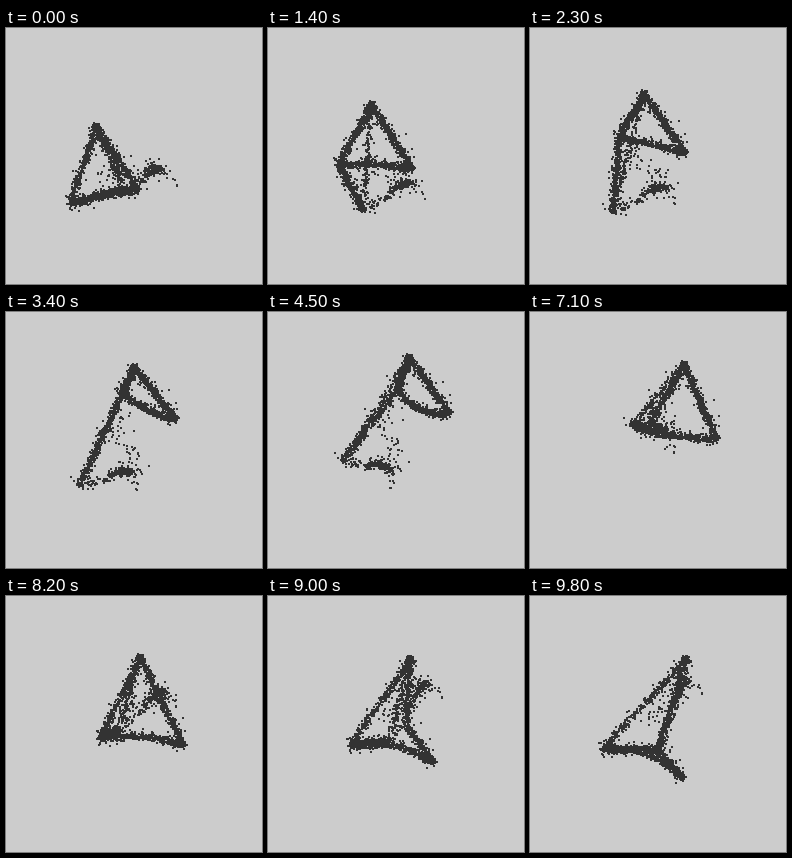
Write an HTML page with a canvas that moves like this. It is 256x256 px and loops after 10000 ms.

```html
<!DOCTYPE html>
<html lang="en">
<head>
<meta charset="utf-8">
<title>Point cloud tour</title>
<style>
html, body { margin: 0; width: 100%; height: 100%; overflow: hidden; background: #ccc; }
canvas { display: block; width: 256px; height: 256px; }
</style>
</head>
<body>
<canvas id="stage" width="256" height="256"></canvas>
<script>
const ctx = document.getElementById('stage').getContext('2d');
const LOOP = 10000, STEP = 100;
const SPAN = 15; // steps between two key points of a path

const clamp = (v, lo, hi) => Math.min(hi, Math.max(lo, v));
const mix = (a, b, u) => a.map((v, i) => v + (b[i] - v) * u);

// Catmull-Rom curve through evenly timed points
function path(...pts) {
  const at = i => pts[clamp(i, 0, pts.length - 1)];
  return s => {
    const i = Math.min(Math.floor(s / SPAN), pts.length - 2), u = s / SPAN - i;
    const [a, b, c, d] = [-1, 0, 1, 2].map(k => at(i + k));
    return b.map((v, k) => v + 0.5 * u * (c[k] - a[k]
      + u * (2 * a[k] - 5 * v + 4 * c[k] - d[k]
      + u * (3 * (v - c[k]) + d[k] - a[k]))));
  };
}

// Corners of the cloud and the end of its loose arm
const corners = {
  top: path([90, 99], [106, 74], [127, 57], [146, 44], [162, 49], [134, 62], [156, 63]),
  left: path([65, 175], [74, 130], [115, 82], [132, 79], [125, 106], [95, 142], [73, 153]),
  right: path([132, 161], [147, 137], [169, 108], [185, 101], [189, 117], [178, 149], [153, 182]),
  base: path([118, 161], [91, 183], [74, 174], [78, 138], [98, 106], [112, 134], [128, 154]),
  hand: path([156, 142], [143, 157], [129, 162], [124, 158], [130, 139], [159, 95], [157, 82])
};

function pose(s) {
  const p = { s };
  for (const name in corners) p[name] = corners[name](s);
  p.elbow = mix(p.base, p.hand, 0.5);
  p.core = [0, 1].map(k => (p.top[k] + p.left[k] + p.base[k]) / 3);
  p.tip = [p.hand[0] + 10 + 10 * Math.cos(s * Math.PI / 45), p.hand[1] + 18];
  // the low edge bends out and back; the outer edge folds onto the base at the end
  p.bow = 10 * Math.cos((s - 45) / 15) * Math.min(1, s / 40);
  p.fold = clamp((s - 75) / 15, 0, 1);
  return p;
}

const line = (a, b) => (p, u) => mix(p[a], p[b], u);

function lowEdge(p, u) {
  const [x, y] = mix(p.left, p.right, u);
  const dx = p.right[0] - p.left[0], dy = p.right[1] - p.left[1];
  const k = 4 * u * (1 - u) * p.bow / Math.hypot(dx, dy);
  return [x - dy * k, y + dx * k];
}
function outerEdge(p, u) {
  const m = mix(mix(p.top, p.right, 0.5), p.base, p.fold);
  return u < 0.5 ? mix(p.top, m, 2 * u) : mix(m, p.right, 2 * u - 1);
}
function forearm(p, u) {
  const [x, y] = mix(p.elbow, p.hand, u);
  return [x, y - 5 * Math.sin(Math.PI * u)];
}

let seed = 71;
function rnd() {
  seed = (seed * 16807) % 2147483647;
  return seed / 2147483647;
}
const gauss = () => Math.sqrt(-2 * Math.log(rnd())) * Math.cos(2 * Math.PI * rnd());

// Some dots stray further from their strand than the rest
function strand(shape, count, spread) {
  const dots = Array.from({ length: count }, () => {
    const r = spread * (rnd() < 0.12 ? 2.2 : 1);
    return { u: rnd(), dx: gauss() * r, dy: gauss() * r };
  });
  return { shape, dots };
}

const cloud = [
  strand(outerEdge, 440, 1.8),
  strand(line('top', 'left'), 340, 1.8),
  strand(lowEdge, 420, 1.8),
  strand(line('left', 'base'), 380, 1.8),
  strand(line('top', 'base'), 180, 1.7),
  strand(line('top', 'top'), 36, 2),
  strand(line('base', 'elbow'), 36, 2.6),
  strand(forearm, 170, 1.8),
  strand(line('hand', 'tip'), 6, 1),
  strand(line('core', 'hand'), 55, 5)
];

function draw(s) {
  ctx.fillStyle = '#ccc';
  ctx.fillRect(0, 0, 256, 256);
  ctx.fillStyle = '#333';
  const p = pose(s);
  for (const { shape, dots } of cloud) {
    for (const d of dots) {
      const [x, y] = shape(p, d.u);
      ctx.fillRect(Math.round(x + d.dx - 1), Math.round(y + d.dy - 1), 2, 2);
    }
  }
}

let shown = -1;
function tick() {
  const n = Math.floor((performance.now() % LOOP) / STEP);
  const s = n - Math.floor(n / 11); // every eleventh step holds
  if (s !== shown) draw(shown = s);
  requestAnimationFrame(tick);
}
tick();
</script>
</body>
</html>
```
